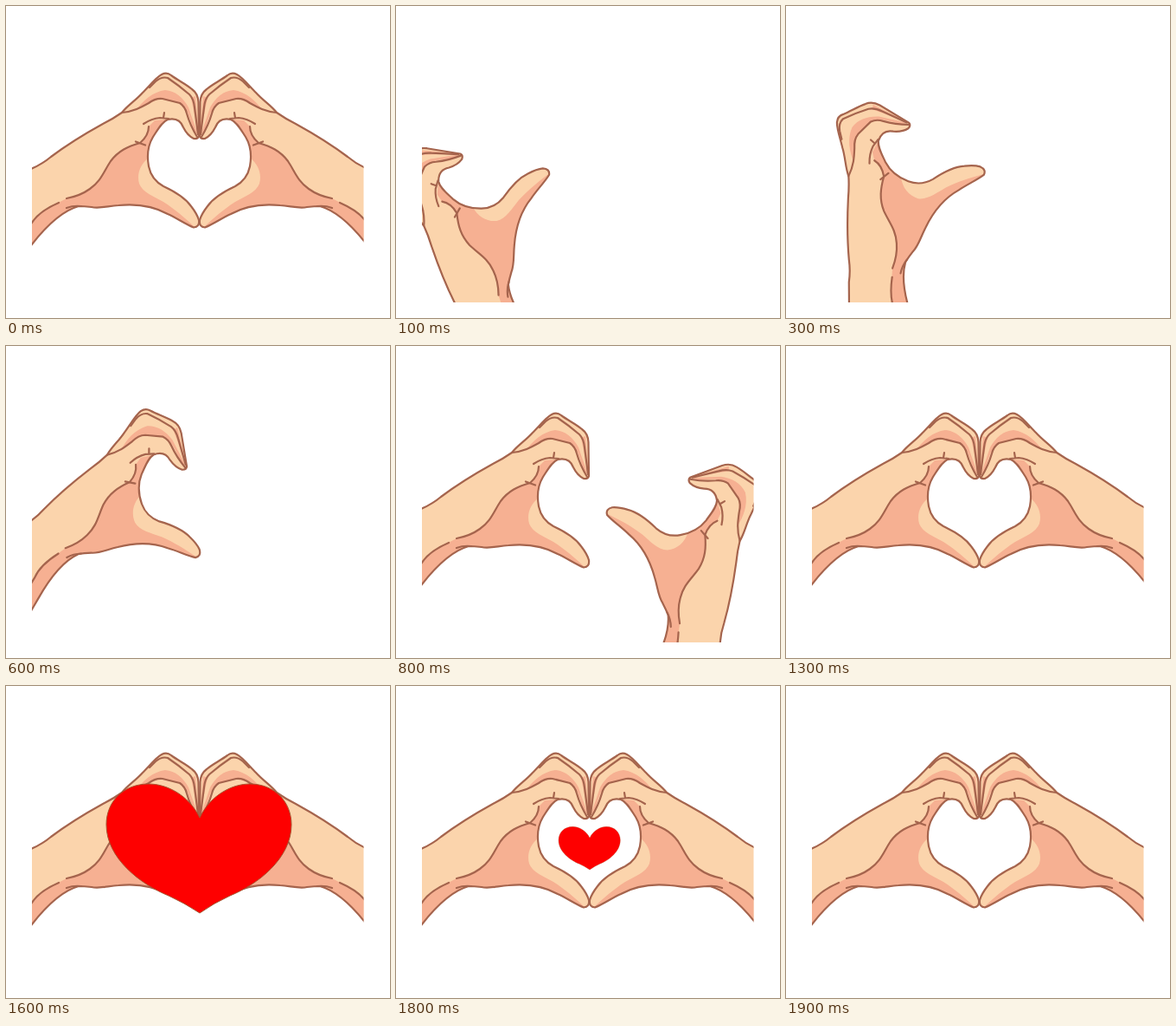
Recreate the animation shown at these times as an HTML page. Size 444 px wide and 360 px high, loop 2000 ms.

```html
<!DOCTYPE html>
<html lang="en">
<head>
<meta charset="utf-8">
<title>Heart hands</title>
<style>
  html, body { margin: 0; width: 100%; height: 100%; overflow: hidden; background: #fff; }
  svg { display: block; width: 100vw; height: 100vh; }
  .line { fill: none; stroke: #a5644d; stroke-width: 2.2; stroke-linecap: round; stroke-linejoin: round; }
  .shade { fill: #f6b092; }
</style>
</head>
<body>
<svg viewBox="0 0 444 360">
  <defs>
    <clipPath id="stage"><rect x="30" y="60" width="383.5" height="282"/></clipPath>
    <path id="outline" d="M-20 219 L10 200 L30 187.500 C38 184 46 179 52 174 C68 162 92 147 112 136 Q124 130 134 123
      C140 115 150 109 158 100 C166 92 174 82 180 79 Q186 76 191 80 C199 86 208 90 215 96 Q222 101 222.500 111
      L223 150 Q222 154 217 153 C211 150 208 146 205 140 C202 132 196 129 187 131 C180 134 176 142 170 151
      C164 161 163 174 165 185 C167 195 173 203 182 208 C195 214 207 221 214 231 Q221 240 223 247
      Q224 255 217 255.500 C208 252 198 245 187 240 C171 231 150 228 130 230 C117 231 108 234 99 232
      Q90 231 84 231 C66 236 48 252 30 275 L0 312 Z"/>
    <clipPath id="skin"><use href="#outline"/></clipPath>
    <g id="hand">
      <use href="#outline" fill="#fbd4ac"/>
      <g clip-path="url(#skin)">
        <path class="shade" d="M165 139 C165 146 162 152 155 158 C141 162 130 167 121 179 C113 191 110 202 97 211
          Q86 219 70 222 Q60 227 47 235 Q36 242 30 250 L-14 306 L20 330 L223 262 L217 254
          C205 243 196 235 182 226 C171 220 158 215 154 205 C151 194 155 183 165 175 L186 131 L172 132 Z"/>
        <path class="shade" d="M150 121 C158 109 170 99 184 97 C196 98 205 106 211 117 L222 149 L216 142 C212 124 206 113 200 112 L178 107 Q165 112 150 121 Z"/>
        <path class="shade" d="M214 106 L219 104 L223 150 Z"/>
      </g>
      <g class="line">
        <path d="M134 123 C147 122 156 117 165 112 Q173 106 181 107 L201 112 Q207 116 209 124 Q213 138 221 151"/>
        <path d="M166 94 L173 87 Q180 81 187 83 C196 89 205 96 212 102 Q217 107 218 117 L222 148"/>
        <path d="M159 136 Q168 130 178 129 L188 130 M183 123 L182 129"/>
        <path d="M165 139 C165 146 162 152 155 158 C141 162 130 167 121 179 C113 191 110 202 97 211 Q86 219 70 222"/>
        <path d="M150 156.500 L161 160.500 M61 227 Q38 237 30 250 L6 278 M70 233 Q78 230 87 231"/>
        <use href="#outline"/>
      </g>
    </g>
  </defs>
  <rect width="444" height="360" fill="#fff"/>
  <g clip-path="url(#stage)">
    <g transform="translate(447 0) scale(-1 1)"><use id="right" href="#hand"/></g>
    <use id="left" href="#hand"/>
    <path id="heart" fill="#fe0000" stroke="#a9532f" d="M224 152 C211 125 185 113 165 113 C136 113 116 133 116 160
      C116 199 156 229 188 242 Q206 250 224 262 Q241 250 259 242 C291 229 330 199 330 160
      C330 133 310 113 282 113 C262 113 237 125 224 152 Z"/>
  </g>
</svg>
<script>
  const STEP = 100, LOOP = 2000, TIP = [222, 153];
  // Counter-clockwise turn and index fingertip position for each step of the entrance.
  const poses = [
    [80, 77, 172], [69, 109, 153.5], [58.4, 144, 137], [48, 150, 127],
    [37, 156.5, 118.5], [8.7, 208.5, 142], [0, ...TIP]
  ];
  const byId = id => document.getElementById(id);
  const left = byId("left"), right = byId("right"), heart = byId("heart");

  const show = (el, on) => el.setAttribute("visibility", on ? "visible" : "hidden");

  function setHand(el, step) {
    show(el, step > 0);
    if (step <= 0) return;
    const [turn, x, y] = poses[Math.min(step, poses.length) - 1];
    el.setAttribute("transform",
      `translate(${x} ${y}) rotate(${-turn}) translate(${-TIP[0]} ${-TIP[1]})`);
  }

  function draw(ms) {
    const n = Math.floor((ms % LOOP) / STEP);
    setHand(left, n || poses.length);
    setHand(right, n ? n - 6 : poses.length);
    const size = 1 - Math.abs(n - 16) / 3;
    show(heart, size > 0.01);
    heart.setAttribute("transform", `translate(224 187) scale(${Math.max(size, 0)}) translate(-224 -187)`);
  }

  const start = performance.now();
  function tick() {
    draw(performance.now() - start);
    requestAnimationFrame(tick);
  }
  tick();
</script>
</body>
</html>
```
